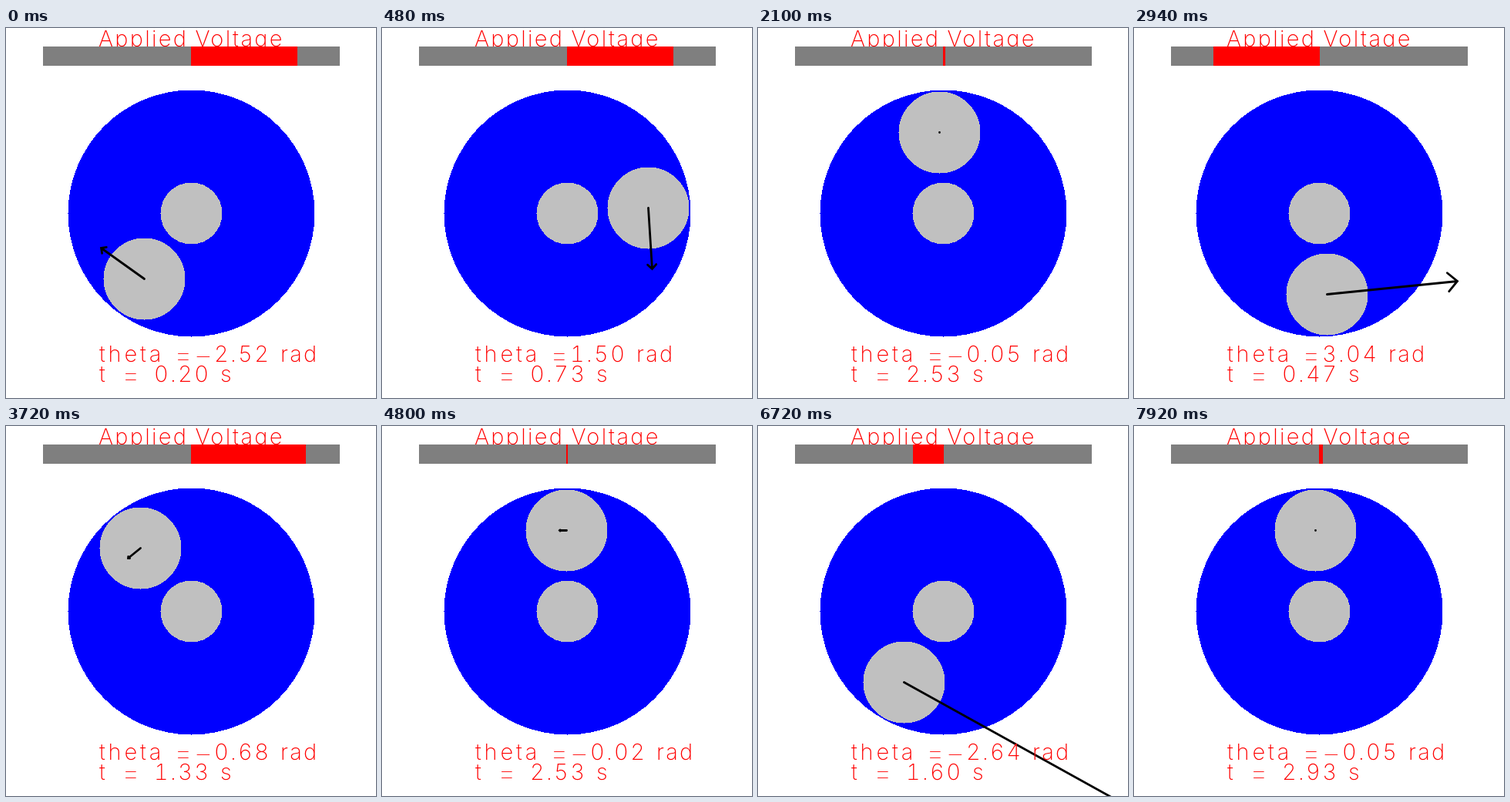
Animation, 480 px wide and 480 px high, one loop 7980 ms. Source, as an HTML page:

```html
<!DOCTYPE html>
<html lang="en">
<head>
<meta charset="utf-8">
<title>Unbalanced disc swing-up</title>
<style>
  html, body { margin: 0; width: 100%; height: 100%; overflow: hidden; background: #fff; }
  svg { display: block; width: 100vw; height: 100vh; }
  text {
    font: 200 29px Inter, "DejaVu Sans", sans-serif;
    font-variant-numeric: tabular-nums;
    letter-spacing: 2.3px;
    fill: #f00;
  }
  .wide { letter-spacing: 3.8px; }
  .op { font-size: 40px; font-weight: 100; }
  circle, rect { shape-rendering: crispEdges; }
</style>
</head>
<body>
<svg viewBox="0 0 480 480">
  <text y="24"><tspan x="120">Applied</tspan><tspan x="245.5">Voltage</tspan></text>
  <rect x="48" y="24" width="385" height="25" fill="#7f7f7f"/>
  <rect id="volts" y="24" height="25" fill="#f00"/>
  <circle cx="240.5" cy="240.5" r="160" fill="#00f"/>
  <circle cx="240.5" cy="240.5" r="40" fill="#c0c0c0"/>
  <circle id="weight" r="53" fill="#c0c0c0"/>
  <path id="arrow" fill="none" stroke="#000" stroke-width="2.8" stroke-linecap="round"/>
  <text class="wide" x="121" y="433">theta</text>
  <text class="op" x="217" y="438">=</text>
  <text class="op" id="sign" x="243" y="438">−</text>
  <text id="angle" y="433"></text>
  <text id="unit" y="433">rad</text>
  <text x="121" y="459">t</text>
  <text class="op" x="149" y="464">=</text>
  <text id="clock" x="192" y="459"></text>
  <text x="278" y="459">s</text>
</svg>
<script>
const FRAME_MS = 60, FRAMES = 133, STEP = 1 / 15;
const CENTER = 240.5, ORBIT = 105.6, SPEED_SCALE = 20;
const FULL_PUSH = 137, BRAKE = 160;
const OVERSHOOT = -3.35, WOBBLE = 1.1;
const { PI, abs, sin, cos, exp, trunc, floor, round, min, max } = Math;
const el = id => document.getElementById(id);
const set = (id, attrs) => {
  for (const name in attrs) el(id).setAttribute(name, attrs[name]);
};

// Turning points of the swing as [step, angle from the bottom]; the last
// swing goes over the top and then settles at the rest angle.
const swing = (back, peak, height, top) =>
  [[0, 0], [4.3, .785], [back, -1.75], [peak, height], [top, OVERSHOOT]];

const episodes = [
  { from: -3, turns: swing(10.2, 18.03, 2.46, 25.03), rest: -.05, damping: .35, drag: 11.94, hold: 2 },
  { from: 42, turns: swing(11, 19.84, 2.466, 28), rest: -.0155, damping: .19, drag: 12, hold: -2 },
  { from: 88, turns: swing(11.5, 21.243, 2.46, 28.243), rest: -.05, damping: .35, drag: 10.77, hold: 4 }
];

function settle({ turns, rest, damping, hold }, step) {
  const after = step - turns.at(-1)[0];
  const size = (OVERSHOOT + PI - rest) * exp(-damping * after);
  const phase = WOBBLE * after;
  return {
    angle: rest - PI + size * cos(phase),
    speed: -size * (WOBBLE * sin(phase) + damping * cos(phase)) / STEP,
    volts: hold + BRAKE * exp(-after / 2)
  };
}

function state(episode, step) {
  const { turns, drag } = episode;
  const next = turns.findIndex(([end]) => end > step);
  if (next < 0) return settle(episode, step);

  const [start, a] = turns[next - 1], [end, b] = turns[next];
  const phase = PI * (step - start) / (end - start);
  const half = (b - a) / 2;
  const speed = half * sin(phase) * PI / ((end - start) * STEP);
  const falling = next === turns.length - 1;
  return {
    angle: a + half * (1 - cos(phase)),
    speed,
    volts: falling ? BRAKE + drag * speed : FULL_PUSH * Math.sign(half)
  };
}

function arrowPath(x, y, dx, dy) {
  const tx = x + dx, ty = y + dy, k = .1 * Math.SQRT1_2;
  return `M${x} ${y}L${tx} ${ty}` +
    `M${tx - k * (dx - dy)} ${ty - k * (dx + dy)}L${tx} ${ty}` +
    `L${tx - k * (dx + dy)} ${ty - k * (dy - dx)}`;
}

function draw(frame) {
  const episode = episodes.filter(e => e.from <= frame).pop();
  const step = frame - episode.from;
  const { angle, speed, volts } = state(episode, step);
  let theta = angle - PI;
  if (theta < -PI) theta += 2 * PI;

  const x = CENTER + trunc(ORBIT * sin(theta));
  const y = CENTER - trunc(ORBIT * cos(theta));
  const length = SPEED_SCALE * speed;
  set("weight", { cx: x, cy: y });
  set("arrow", { d: arrowPath(x, y, trunc(length * cos(theta)), trunc(length * sin(theta))) });

  const bar = round(volts);
  set("volts", { x: 240 + min(0, bar), width: abs(bar) + 1 });

  const shift = theta < 0 ? 26 : 0;
  el("sign").textContent = shift ? "−" : "";
  set("angle", { x: 244 + shift });
  el("angle").textContent = abs(theta).toFixed(2);
  set("unit", { x: 330 + shift });
  el("clock").textContent = (step * STEP).toFixed(2);
}

const began = performance.now();
function tick() {
  draw(floor(max(0, performance.now() - began) / FRAME_MS) % FRAMES);
  requestAnimationFrame(tick);
}
tick();
</script>
</body>
</html>
```
